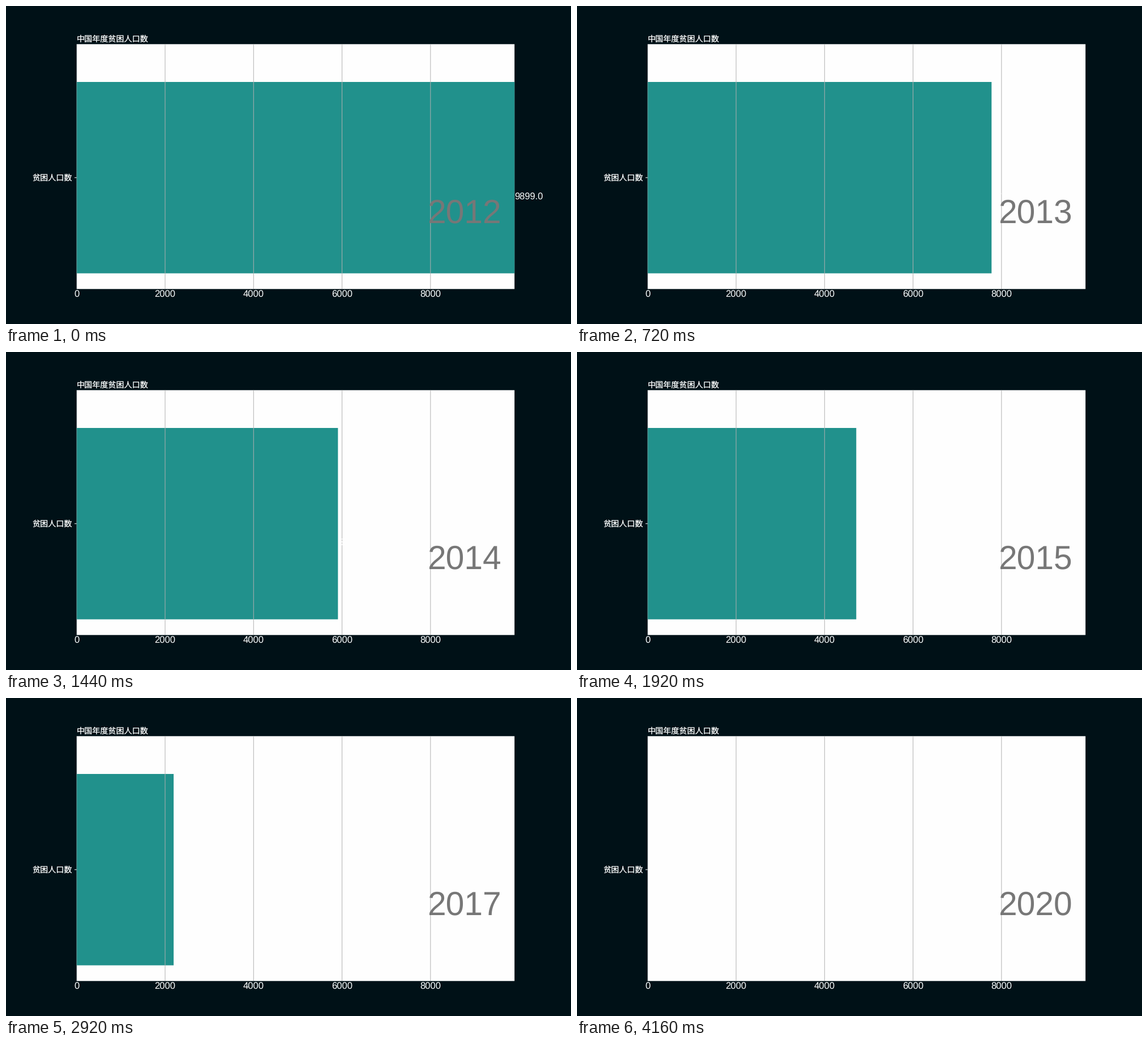
These frames come from a looping animation (998 px wide and 561 px high, 4200 ms). A matplotlib script:

```python
import matplotlib.pyplot as plt
import numpy as np
from matplotlib.animation import FuncAnimation
from matplotlib.patches import Rectangle

plt.rcParams["text.hinting"] = "none"

W, H, DPI = 998, 561, 64
LEFT, RIGHT, TOP, BOTTOM = 0.125 * W, 0.9 * W, 0.12 * H, 0.89 * H
BAR_TOP, BAR_BOTTOM = 134, 471.6
FRAMES, INTERVAL, STEPS = 105, 40, 13

BACK, PAPER, TEAL = "#001117", "#fefefe", "#21918c"
GRID, GREY = "#b0b0b0", "#777777"
SANS, HAN = "Liberation Sans", "Noto Sans CJK JP"

FIRST_YEAR = 2012
POOR = [9899, 8249, 7017, 5575, 4335, 3046, 1660, 551, 0]

fig = plt.figure(figsize=(W / DPI, H / DPI), dpi=DPI, facecolor=BACK)
ax = fig.add_axes([0, 0, 1, 1])
ax.set_xlim(0, W)
ax.set_ylim(H, 0)
ax.axis("off")


def to_px(value):
    return LEFT + value * (RIGHT - LEFT) / POOR[0]


def box(x0, y0, x1, y1, color):
    return ax.add_patch(Rectangle((x0, y0), x1 - x0, y1 - y0, color=color,
                                  lw=0, zorder=1, snap=False))


def line(xs, ys, color):
    return ax.plot(xs, ys, color=color, lw=72 / DPI, zorder=2, snap=False,
                   solid_capstyle="butt")[0]


def write(x, baseline, text, size, font=SANS, color=PAPER, ha="center"):
    return ax.text(x, baseline, text, fontsize=size * 72 / DPI, family=font,
                   color=color, ha=ha, va="baseline", zorder=3)


panel = box(LEFT, TOP, RIGHT, BOTTOM, PAPER)
bar = box(LEFT, BAR_TOP, RIGHT, BAR_BOTTOM, TEAL)

for tick in range(0, 10000, 2000):
    x = to_px(tick)
    line([x, x], [TOP, BOTTOM], GRID).set_clip_path(panel)
    write(x, 514, str(tick), 16.6)

line([121, LEFT], [302.8, 302.8], PAPER)
write(LEFT, 62.8, "中国年度贫困人口数", 14.1, HAN, ha="left")
write(116.9, 307.8, "贫困人口数", 14.1, HAN, ha="right")
count = write(RIGHT, 342.3, "", 16.5, ha="left")
year = write(809.7, 382.5, "", 58.7, color=GREY)


def update(i):
    value = float(np.interp(i / STEPS, range(len(POOR)), POOR))
    end = to_px(value)
    bar.set_width(end - LEFT)
    count.set_x(end)
    count.set_text(str(round(value, 2)))
    year.set_text(str(FIRST_YEAR + i // STEPS))
    return bar, count, year


anim = FuncAnimation(fig, update, frames=FRAMES, interval=INTERVAL,
                     repeat=True, repeat_delay=0)
plt.show()
```
